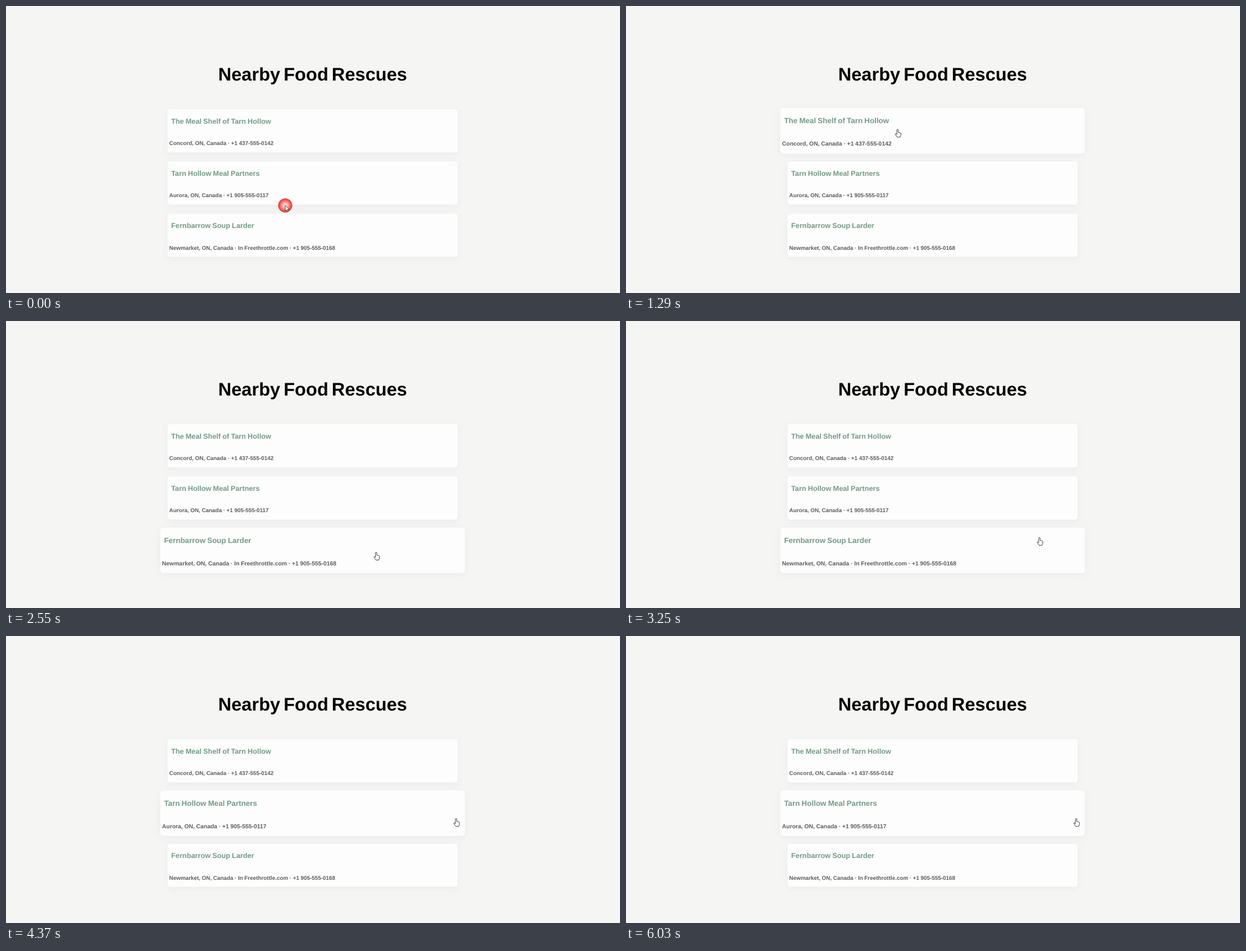
Recreate the animation shown at these times as an HTML page. Size 1093 by 512 pixels, loop 6050 ms.

```html
<!DOCTYPE html>
<html lang="en">
<head>
<meta charset="utf-8">
<title>Nearby Food Rescues</title>
<style>
  html, body { margin: 0; width: 100%; height: 100%; overflow: hidden; background: #f5f5f4; }
  svg { display: block; width: 100vw; height: 100vh; }
  text { font-family: "Liberation Sans", Arial, sans-serif; font-weight: 700; text-rendering: geometricPrecision; }
  .heading { font-size: 32.6px; word-spacing: -3px; text-anchor: middle; fill: #050505; }
  .panel { fill: #fdfdfd; filter: drop-shadow(0 3px 6px rgba(60, 60, 120, .06)); }
  .name { font-size: 12.75px; word-spacing: -.5px; fill: #739b87; }
  .info { font-size: 9.9px; word-spacing: -.15px; fill: #5e5e5e; }
  #pointer path { fill: #fff; stroke: #3c3c3c; stroke-linejoin: round; }
</style>
</head>
<body>
<svg viewBox="0 0 1093 512" xmlns="http://www.w3.org/2000/svg">
  <defs>
    <radialGradient id="glow">
      <stop offset="0" stop-color="#fff0ee"/>
      <stop offset=".35" stop-color="#fbb9b3"/>
      <stop offset=".8" stop-color="#f4564f"/>
      <stop offset="1" stop-color="#ec3a35"/>
    </radialGradient>
  </defs>
  <text class="heading" x="545.8" y="132.8">Nearby Food Rescues</text>
  <g id="cards"></g>
  <circle id="click" r="12.3" fill="url(#glow)" stroke="#d8403c" stroke-width=".7"/>
  <g id="pointer">
    <path id="arrow" d="M0 0V10.2L2.4 8L4 11.8L5.6 11L4 7.4H7.2Z"/>
    <path id="hand" d="M-1.3 7.5V1.2a1.2 1.2 0 0 1 2.4 0V5.2l3.5 .8q1.6 .4 1.4 2L5.6 11.2L4.6 14H-.6L-4 9.2q-.6-1.3 .7-1.5q.9 0 2 1.6Z"/>
  </g>
</svg>
<script>
const LOOP = 6050, FIRST = -3;
const LEFT = 287.6, TOP = 183.9, WIDTH = 516.4, HEIGHT = 77.3, PITCH = 93.25;
const MID = LEFT + WIDTH / 2;
const ZOOM = .05, ZOOM_STEPS = 7;

const cards = [
  ["The Meal Shelf of Tarn Hollow", "Concord, ON, Canada · +1 437-555-0142"],
  ["Tarn Hollow Meal Partners", "Aurora, ON, Canada · +1 905-555-0117"],
  ["Fernbarrow Soup Larder", "Newmarket, ON, Canada · In Freethrottle.com · +1 905-555-0168"]
].map(([name, info], i) => ({ name, info, top: TOP + i * PITCH }));

// Key points of the pointer tip: step, x, y
const path = [
  [FIRST, 497, 355.5], [5, 425, 225], [8, 425, 225], [13, 393, 181.5], [15, 391, 181.3],
  [22, 440, 222], [36, 592, 215], [39, 624, 345.8], [53, 659, 412.5],
  [75, 772, 374], [80, 787.5, 327.5], [86, 801.3, 325.6]
];

const $ = id => document.getElementById(id);
const clamp = v => Math.min(1, Math.max(0, v));
const smooth = v => v * v * (3 - 2 * v);
const inside = (card, y) => y > card.top && y < card.top + HEIGHT;

function make(tag, parent, attrs, text = "") {
  const el = document.createElementNS("http://www.w3.org/2000/svg", tag);
  for (const key in attrs) el.setAttribute(key, attrs[key]);
  el.textContent = text;
  return parent.appendChild(el);
}

function pointerAt(n) {
  const i = path.findIndex(p => p[0] > n);
  const b = path.at(i), a = i > 0 ? path[i - 1] : b;
  const k = a === b ? 0 : (n - a[0]) / (b[0] - a[0]);
  return [1, 2].map(c => a[c] + (b[c] - a[c]) * k);
}

// A card grows while the pointer is over it and shrinks afterwards
function hoverAt(card, n) {
  let amount = 0;
  for (let k = FIRST; k <= n; k++) {
    const dir = inside(card, pointerAt(k)[1]) ? 1 : -1;
    amount = clamp(amount + dir / ZOOM_STEPS);
  }
  return smooth(amount);
}

// Steps come in threes, lasting 20, 20 and 100 ms
function stepAt(t) {
  const group = Math.floor((t - 130) / 140);
  const rest = t - 130 - group * 140;
  return group * 3 + Math.min(2, Math.floor(rest / 20));
}

for (const card of cards) {
  card.el = make("g", $("cards"), {});
  make("rect", card.el, { class: "panel", x: LEFT, y: card.top, width: WIDTH, height: HEIGHT, rx: 5 });
  make("text", card.el, { class: "name", x: LEFT + 6.4, y: card.top + 26 }, card.name);
  make("text", card.el, { class: "info", x: LEFT + 3, y: card.top + 64.1 }, card.info);
}

function draw(t) {
  const n = stepAt(t);
  const [x, y] = pointerAt(n);
  for (const card of cards) {
    const mid = card.top + HEIGHT / 2;
    const scale = 1 + ZOOM * hoverAt(card, n);
    card.el.setAttribute("transform",
      `translate(${MID} ${mid}) scale(${scale}) translate(${-MID} ${-mid})`);
  }
  const over = cards.some(card => inside(card, y));
  $("arrow").style.display = over ? "none" : "";
  $("hand").style.display = over ? "" : "none";
  $("pointer").setAttribute("transform", `translate(${x} ${y})`);
  $("click").setAttribute("transform", `translate(${x} ${y + .3})`);
  $("click").style.opacity = clamp((2 - n) / 4);
}

const start = performance.now();
function tick() {
  draw((performance.now() - start) % LOOP);
  requestAnimationFrame(tick);
}
tick();
</script>
</body>
</html>
```
